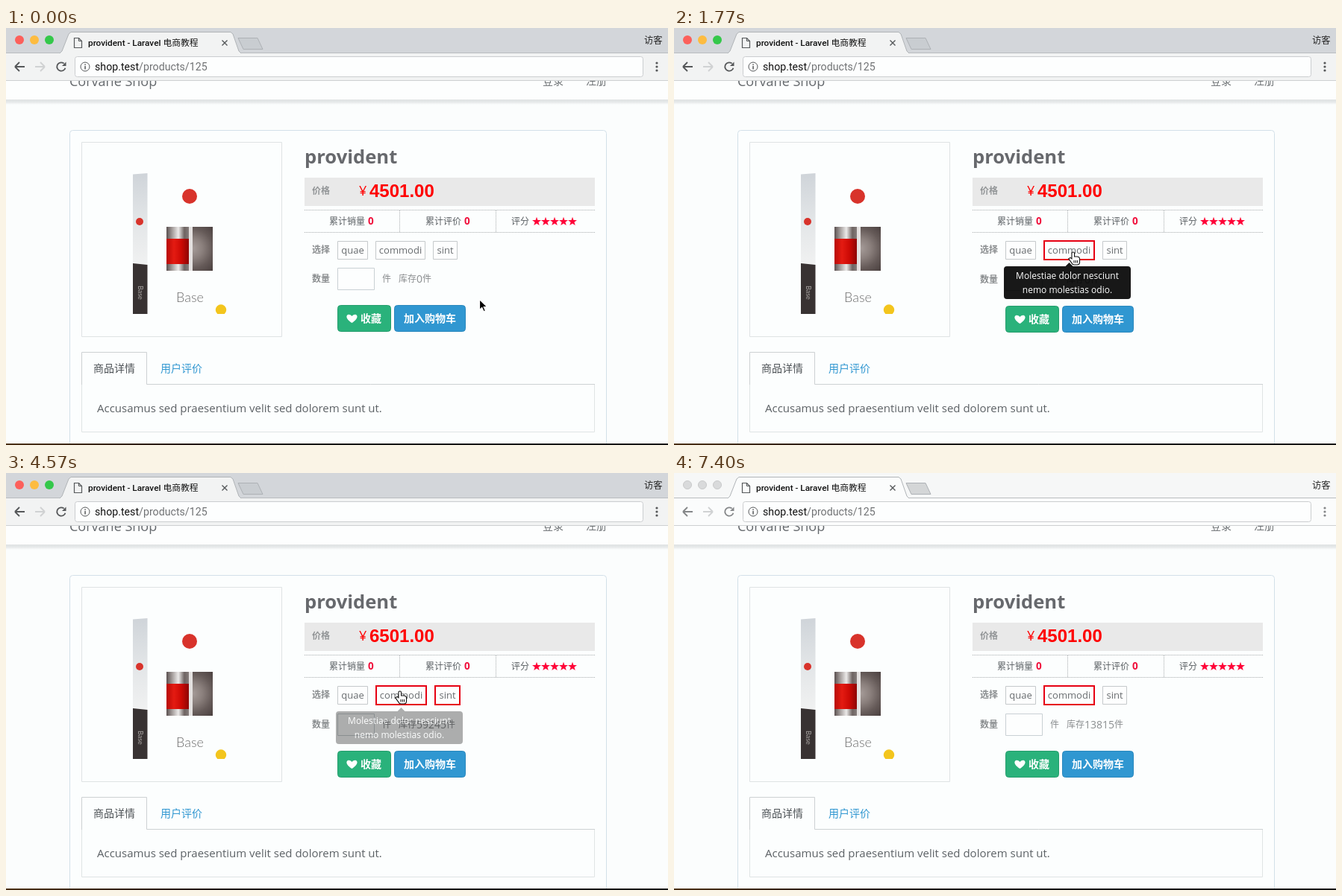
An HTML page with a canvas that plays this animation: 887x560 px, repeating every 7500 ms.

```html
<!DOCTYPE html>
<html lang="zh-CN">
<head>
<meta charset="utf-8">
<title>Product page</title>
<style>
html, body { margin: 0; width: 100%; height: 100%; overflow: hidden; background: #fbfdfd; }
canvas { display: block; }
</style>
</head>
<body>
<canvas id="stage" width="887" height="560"></canvas>
<script>
const stage = document.getElementById('stage');
const layer = document.createElement('canvas');
layer.width = stage.width;
layer.height = stage.height;
const stagePen = stage.getContext('2d'), layerPen = layer.getContext('2d');
let c = stagePen;

const LOOP = 7500, TICK = 147.4, BLUR_AT = 7400;
const CJK = '"Noto Sans CJK SC", "Noto Sans CJK", sans-serif';
const PAGE = '"Open Sans", ' + CJK;
const UI = 'Roboto, ' + CJK;
const GREY = '#8a8d8f', INK = '#5c6165';

const chips = [
  { name: 'quae', width: 41, tipX: 379, tipWidth: 200,
    tip: ['Exercitationem non atque fugit', 'quae necessitatibus aperiam', 'porro.'] },
  { name: 'commodi', width: 67, tipX: 442, tipWidth: 170,
    tip: ['Molestiae dolor nesciunt', 'nemo molestias odio.'] },
  { name: 'sint', width: 33, tipX: 504, tipWidth: 108,
    tip: ['Dolores', 'distinctio velit in', 'et.'] }
];

// Times below are in ticks; the picture is sampled once per tick.
const home = { x: 634, y: 364 };
const moves = [
  { from: 2, to: 6, x: 472, y: 303 },
  { from: 8, to: 15, x: 580, y: 300 },
  { from: 19, to: 22, x: 669, y: 376 },
  { from: 23, to: 31, x: 527, y: 293 },
  { from: 35, to: 36, x: 546, y: 342 },
  { from: 37, to: 44, x: 574, y: 336 },
  { from: 45, to: 47, x: 836, y: 535 }
];
const hovers = [
  { chip: 0, enter: 5.6, leave: 10.6 },
  { chip: 1, enter: 10.6, leave: 14.1 },
  { chip: 2, enter: 14.4, leave: 19.9 },
  { chip: 1, enter: 30.65, leave: 35.9 }
];
const clicks = [{ tick: 18, chip: 2 }, { tick: 34, chip: 1 }];

const clamp = v => Math.min(1, Math.max(0, v));

function text(str, x, y, size, color, { font = PAGE, weight = 400, align = 'left' } = {}) {
  c.font = `${weight} ${size}px ${font}`;
  c.fillStyle = color;
  c.textAlign = align;
  c.fillText(str, x, y);
  return x + c.measureText(str).width;
}

function rect(x, y, w, h, fill) {
  c.fillStyle = fill;
  c.fillRect(x, y, w, h);
}

function paint(fill, stroke, line = 1) {
  if (fill) { c.fillStyle = fill; c.fill(); }
  if (stroke) { c.strokeStyle = stroke; c.lineWidth = line; c.stroke(); }
}

function box(x, y, w, h, stroke, fill, radius = 0, line = 1) {
  c.beginPath();
  c.roundRect(x + line / 2, y + line / 2, w - line, h - line, radius);
  paint(fill, stroke, line);
}

function shape(points, fill, stroke, line, open = false) {
  c.beginPath();
  points.forEach(([x, y]) => c.lineTo(x, y));
  if (!open) c.closePath();
  paint(fill, stroke, line);
}

function lines(color, width, ...segments) {
  c.beginPath();
  for (const [x1, y1, x2, y2] of segments) { c.moveTo(x1, y1); c.lineTo(x2, y2); }
  paint(null, color, width);
}

function disc(x, y, r, fill, stroke) {
  c.beginPath();
  c.arc(x, y, r, 0, Math.PI * 2);
  paint(fill, stroke);
}

function clipped(x, y, w, h, draw) {
  c.save();
  c.beginPath();
  c.rect(x, y, w, h);
  c.clip();
  draw();
  c.restore();
}

function withStops(gradient, colors) {
  colors.forEach((color, i) => gradient.addColorStop(i / (colors.length - 1), color));
  return gradient;
}
const across = (x, w, ...colors) => withStops(c.createLinearGradient(x, 0, x + w, 0), colors);
const down = (y, h, ...colors) => withStops(c.createLinearGradient(0, y, 0, y + h), colors);
const around = (x, y, r, ...colors) => withStops(c.createRadialGradient(x, y, 0, x, y, r), colors);

function star(x, y, r) {
  shape(Array.from({ length: 10 }, (_, i) => {
    const a = i * Math.PI / 5 - Math.PI / 2, d = i % 2 ? r * .4 : r;
    return [x + d * Math.cos(a), y + d * Math.sin(a)];
  }), '#ff0036');
}

function heart(x, y) {
  c.beginPath();
  c.moveTo(x, y + 6);
  c.bezierCurveTo(x - 13, y - 2, x - 5, y - 9, x, y - 3);
  c.bezierCurveTo(x + 5, y - 9, x + 13, y - 2, x, y + 6);
  paint('#fff');
}

function arrowIcon(x, dir, color) {
  const tip = x - 6.5 * dir;
  lines(color, 1.8, [x - 6.5, 52, x + 6.5, 52], [tip + 6 * dir, 46, tip, 52], [tip, 52, tip + 6 * dir, 58]);
}

function drawTabs(bar, active) {
  shape([[72, 34], [75, 31], [84, 8], [87, 5.5], [301, 5.5], [304, 8], [312, 31], [315, 34]],
    bar, '#b0b4b7', 1, true);
  shape([[311, 13.5], [337, 13.5], [344, 28.5], [318, 28.5]], active ? '#c9cdd1' : '#d4d6d7', '#adb1b5');
  shape([[91.5, 13.5], [97.5, 13.5], [101.5, 17.5], [101.5, 26.5], [91.5, 26.5]], null, '#55585a', 1.2);
  lines('#55585a', 1.2, [97.5, 13.5, 97.5, 17.5], [97.5, 17.5, 101.5, 17.5]);
  text('provident - Laravel 电商教程', 110, 24, 11.8, '#111', { font: UI, weight: 500 });
  lines('#55585a', 1.4, [289.5, 16.5, 296.5, 23.5], [296.5, 16.5, 289.5, 23.5]);
}

function drawBrowser(active) {
  const bar = active ? '#f2f3f3' : '#fbfcfc';
  const icon = active ? '#555759' : '#858789';
  rect(0, 0, 887, 34, active ? '#d3d6da' : '#f6f7f7');
  rect(0, 34, 887, 37, bar);
  rect(0, 33, 887, 1, '#b9bcbf');
  rect(0, 70, 887, 1, '#cdd0d1');
  ['#fc605b', '#fdbc40', '#34c84a'].forEach((color, i) =>
    disc(18 + 20 * i, 16, active ? 6 : 5.5, active ? color : '#d9dadb', active ? null : '#c8c9ca'));
  drawTabs(bar, active);
  text('访客', 855, 21, 12.3, '#222', { font: CJK, weight: 500 });

  arrowIcon(18.5, 1, icon);
  arrowIcon(45.5, -1, '#d0d2d3');
  c.beginPath();
  c.arc(74, 52, 5.7, .3, 5.4);
  paint(null, icon, 1.8);
  shape([[80.5, 45.5], [80.5, 51], [75, 51]], icon);
  box(92, 38, 762, 28, '#cbcdcf', '#fdfefe', 3);
  disc(106, 52, 6, null, '#555759');
  rect(105.3, 51, 1.5, 4.5, '#555759');
  rect(105.3, 48.5, 1.5, 1.5, '#555759');
  const end = text('shop.test', 119, 57, 14.2, '#111', { font: UI });
  text('/products/125', end, 57, 14.2, '#707274', { font: UI });
  for (let i = -1; i <= 1; i++) disc(872, 52 + 5 * i, 1.6, icon);
}

function drawNav() {
  rect(0, 71, 887, 26, '#fdfefe');
  rect(0, 96, 887, 7, down(96, 7, 'rgba(90,100,105,.18)', 'rgba(90,100,105,.13)', 'rgba(90,100,105,0)'));
  clipped(0, 71, 887, 30, () => {
    text('Corvane Shop', 85, 78, 18, '#65696d');
    text('登录', 719, 76, 14, '#6c7073');
    text('注册', 777, 76, 14, '#6c7073');
  });
}

function drawProduct() {
  box(101, 153, 269, 262, '#dfe3e4', '#fcfefe');
  shape([[170, 196.5], [189.5, 195], [189.5, 318], [170, 316]], down(195, 122, '#cfd4d9', '#e2e5e7', '#f0f1f1'));
  shape([[170, 316], [189.5, 318], [189.5, 384], [170, 384]], '#383232');
  disc(179, 260, 5, '#d8332b');
  c.save();
  c.translate(176.5, 346);
  c.rotate(Math.PI / 2);
  text('Base', 0, 0, 9, '#aaa6a4', { font: 'Lato, sans-serif' });
  c.restore();
  disc(246, 226, 10, '#d8332b');

  rect(215, 267, 32, 59, across(215, 32, '#5b5150', '#a7a09e', '#eceae9', '#6d6361', '#8d8583'));
  rect(215, 283, 30, 34, across(215, 30, '#b80a06', '#e41b12', '#cc0a05', '#8d0504'));
  rect(245, 267, 5, 59, '#e4e1e0');
  rect(250, 267, 27, 59, around(250, 296, 40, '#a59b98', '#8b807d', '#655a58', '#4a403f'));
  text('Base', 228, 368, 18, '#6d6d6d', { font: 'Lato, sans-serif', weight: 300 });
  clipped(278, 368, 20, 16, () => disc(288, 378.5, 7.2, '#f3c51d'));
}

function layoutChips(isBold) {
  let x = 444;
  return chips.map((chip, i) => {
    const w = chip.width + (isBold(i) ? 2 : 0);
    const slot = { x, w, center: x + w / 2 };
    x += w + 10;
    return slot;
  });
}

function drawChips(slots, isBold) {
  text('选择', 410, 302, 12, GREY, { weight: 700 });
  slots.forEach(({ x, w, center }, i) => {
    if (isBold(i)) box(x, 285, w, 27, '#e60012', '#fdfefe', 0, 2);
    else box(x, 286, w, 25, '#c5c9cb', '#fdfefe');
    text(chips[i].name, center, 303, 13, '#686c6f', { align: 'center' });
  });
}

function drawSummary(price) {
  text('provident', 400, 181.5, 25.6, '#67696d', { weight: 700 });
  rect(400, 201, 389, 38, '#e9e9e9');
  text('价格', 410, 223, 12, '#929597', { weight: 700 });
  text('¥', 473, 225, 18, '#f00');
  text(price, 487, 227, 24, '#f00', { font: '"Liberation Sans", Arial, sans-serif', weight: 700 });

  c.setLineDash([1, 1]);
  lines('#a9adaf', 1, [400, 244.5, 789, 244.5], [400, 274.5, 789, 274.5],
    [527.5, 245, 527.5, 274], [656.5, 245, 656.5, 274]);
  c.setLineDash([]);
  [['累计销量', 433], ['累计评价', 562]].forEach(([label, x]) => {
    text(label, x, 263.5, 12, INK);
    text('0', x + 52, 264, 13.5, '#f0103c', { weight: 700 });
  });
  text('评分', 677, 263.5, 12, INK);
  for (let i = 0; i < 5; i++) star(711 + 12 * i, 260, 6.3);
}

function drawOrder(stock) {
  text('数量', 410, 341, 12, GREY, { weight: 700 });
  box(444, 322, 50, 30, '#c9d0d4', '#fdfefe');
  text('件', 504, 341, 12, GREY);
  let x = text('库存', 526, 341, 12, GREY);
  x = text(stock, x, 342, 14, GREY);
  text('件', x, 341, 12, GREY);

  box(444, 372, 72, 36, '#259d6d', '#2ab27b', 4);
  heart(463.5, 390);
  text('收藏', 475, 395, 14, '#fff', { weight: 700 });
  box(520, 372, 96, 36, '#2a88bd', '#3097d1', 4);
  text('加入购物车', 533, 395, 14, '#fff', { weight: 700 });
}

function drawDescription() {
  shape([[101.5, 479], [101.5, 435.5], [188.5, 435.5], [188.5, 478.5], [789, 478.5]], null, '#cdd1d3', 1, true);
  shape([[101.5, 479], [101.5, 542.5], [788.5, 542.5], [788.5, 479]], null, '#e0e4e5', 1, true);
  text('商品详情', 117, 462, 14, '#4d5256');
  text('用户评价', 207, 462, 14, '#3097d1');
  text('Accusamus sed praesentium velit sed dolorem sunt ut.', 122, 516, 15, INK);
}

function drawPage(slots, isBold, picked) {
  rect(0, 0, 887, 560, '#fbfdfd');
  drawNav();
  box(85, 137, 720, 450, '#d3e0e9', '#fcfefe', 4);
  drawProduct();
  drawSummary(picked === 2 ? '6501.00' : '4501.00');
  drawChips(slots, isBold);
  // A thick chip border pushes the rows below down by one pixel.
  c.save();
  c.translate(0, chips.some((_, i) => isBold(i)) ? 1 : 0);
  drawOrder(picked < 0 ? '0' : picked === 1 ? '13815' : '59245');
  c.restore();
  drawDescription();
  rect(0, 558, 887, 2, across(0, 887, '#4b3013', '#1b120c', '#0c0b0d', '#15100e'));
}

// The bubble fades as one group, so its text stays light over the page.
function drawTip({ tip, tipX, tipWidth }, arrowX, opacity) {
  c = layerPen;
  c.clearRect(0, 0, layer.width, layer.height);
  c.beginPath();
  c.roundRect(tipX, 320, tipWidth, 6 + 19 * tip.length, 4);
  c.moveTo(arrowX - 5, 320);
  c.lineTo(arrowX, 315);
  c.lineTo(arrowX + 5, 320);
  paint('#000');
  tip.forEach((row, i) => text(row, tipX + tipWidth / 2, 337 + 19 * i, 12, '#fff', { align: 'center' }));
  c = stagePen;
  c.globalAlpha = .9 * opacity;
  c.drawImage(layer, 0, 0);
  c.globalAlpha = 1;
}

const pointers = {
  arrow() {
    shape([[0, 0], [0, 14], [3.2, 11], [5.6, 16.2], [8, 15.2], [5.7, 10.2], [10.2, 10.2]], '#000', '#fff', 1.2);
  },
  hand() {
    c.beginPath();
    c.roundRect(-1, 0, 2.5, 12, 1.2);
    c.roundRect(-1, 6, 9.5, 10, 3);
    c.moveTo(-1, 14);
    c.lineTo(-5, 8.5);
    c.lineTo(-3.5, 7.5);
    c.lineTo(1, 11);
    paint(null, '#111', 2.2);
    paint('#fff');
    for (let x = 1.5; x < 7; x += 2.3) lines('#111', 1, [x, 10.5, x, 14]);
  },
  beam() {
    for (const [color, width] of [['#fff', 2.4], ['#333', 1]]) {
      lines(color, width, [0, -6, 0, 6]);
      for (const end of [-1, 1])
        lines(color, width, [-3, 7.5 * end, 0, 6 * end], [3, 7.5 * end, 0, 6 * end]);
    }
  }
};

function pointerAt(tick) {
  return moves.reduce((at, { from, to, x, y }) => {
    const k = clamp((tick - from) / (to - from));
    return { x: at.x + (x - at.x) * k, y: at.y + (y - at.y) * k };
  }, home);
}

function drawPointer(tick, hovering) {
  const { x, y } = pointerAt(tick);
  const overText = x > 504 && x < 602 && y > 330 && y < 347;
  c.save();
  c.translate(Math.round(x) + .5, Math.round(y) + .5);
  pointers[hovering ? 'hand' : overText ? 'beam' : 'arrow']();
  c.restore();
}

function render(t) {
  const tick = Math.floor((t + 5) / TICK);
  const active = t < BLUR_AT;
  const hover = hovers.find(h => tick >= h.enter && tick < h.leave);
  const picked = clicks.reduce((chip, click) => tick >= click.tick ? click.chip : chip, -1);
  const isBold = i => i === picked || (hover && i === hover.chip);
  const slots = layoutChips(isBold);

  drawPage(slots, isBold, picked);
  drawBrowser(active);
  for (const { chip, enter, leave } of hovers) {
    const opacity = clamp(tick - enter) * clamp(1 - (tick - leave));
    if (opacity > 0) drawTip(chips[chip], slots[chip].center, opacity);
  }
  if (active) drawPointer(tick, !!hover);
}

const start = performance.now();
function loop() {
  render((performance.now() - start) % LOOP);
  requestAnimationFrame(loop);
}
loop();
</script>
</body>
</html>
```
